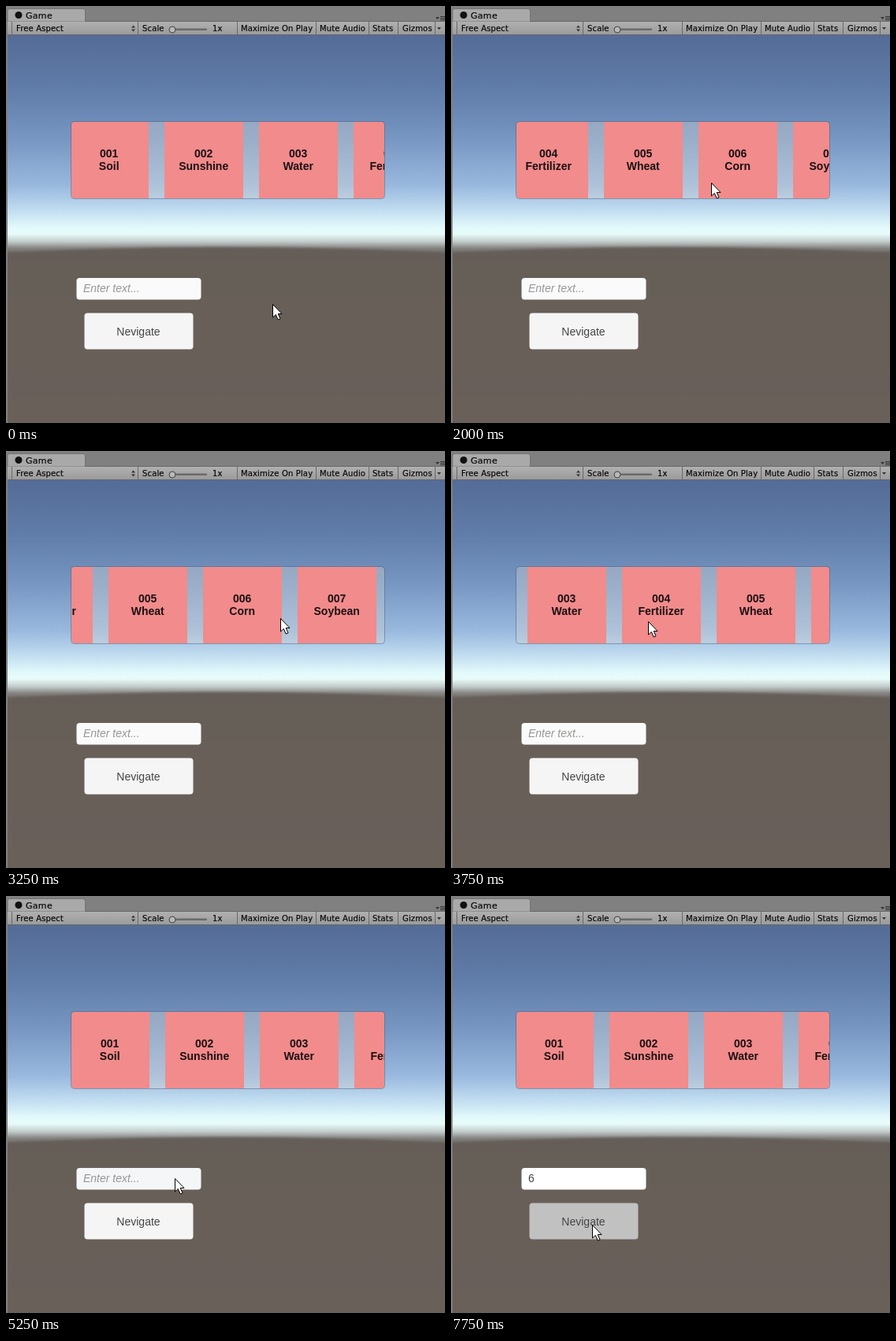
Write an HTML page that moves like this. It is 557 px wide and 529 px high and loops after 8 s.

```html
<!DOCTYPE html>
<html lang="en">
<head>
<meta charset="utf-8">
<title>Card scroller</title>
<style>
  html, body { margin: 0; width: 100%; height: 100%; overflow: hidden; background: #808080; }
  svg { display: block; width: 557px; height: 529px; }
  .ui { font: 10px "DejaVu Sans", sans-serif; letter-spacing: .15px; fill: #080808; stroke: #080808; stroke-width: .2px; }
  .ui.tab { font-size: 11px; letter-spacing: .3px; }
  .card text { font: bold 14px "Liberation Sans", Arial, sans-serif; text-anchor: middle; fill: #1c1012; }
  .control { font: 14px "Liberation Sans", Arial, sans-serif; fill: #454545; }
  #hint { font-style: italic; fill: #979797; }
</style>
</head>
<body>
<svg viewBox="0 0 557 529">
  <defs>
    <linearGradient id="sky" gradientUnits="userSpaceOnUse" x1="0" y1="37" x2="0" y2="317">
      <stop offset="0" stop-color="#546c97"/>
      <stop offset=".24" stop-color="#607ca8"/>
      <stop offset=".47" stop-color="#7796c2"/>
      <stop offset=".68" stop-color="#98b8de"/>
      <stop offset=".8" stop-color="#c4dff1"/>
      <stop offset=".87" stop-color="#e2f9fb"/>
      <stop offset=".9" stop-color="#e8fcfa"/>
      <stop offset=".935" stop-color="#c2cccb"/>
      <stop offset=".965" stop-color="#858482"/>
      <stop offset="1" stop-color="#645d58"/>
    </linearGradient>
    <linearGradient id="ground" x1="0" y1="0" x2="0" y2="1">
      <stop offset="0" stop-color="#655d58"/>
      <stop offset="1" stop-color="#6a605a"/>
    </linearGradient>
    <linearGradient id="bar" x1="0" y1="0" x2="0" y2="1">
      <stop offset="0" stop-color="#b0b0b0"/>
      <stop offset="1" stop-color="#9a9a9a"/>
    </linearGradient>
    <filter id="haze"><feGaussianBlur stdDeviation="1.5"/></filter>
    <clipPath id="view"><rect x="2" y="37" width="555" height="492"/></clipPath>
    <clipPath id="panel"><rect x="83" y="147" width="397" height="97" rx="4"/></clipPath>
  </defs>

  <rect width="557" height="529" fill="#808080"/>
  <g clip-path="url(#view)">
    <rect x="2" y="37" width="555" height="290" fill="url(#sky)"/>
    <path d="M-20 314Q280 298 580 314V560H-20Z" fill="url(#ground)" filter="url(#haze)"/>
  </g>

  <g id="toolbar">
    <path d="M2 20V6Q2 3.500 5 3.500H97Q100.500 3.500 100.500 6V20Z" fill="#a9a9a9" stroke="#666" stroke-width=".7"/>
    <rect x="2" y="20" width="555" height="17" fill="url(#bar)"/>
    <path d="M101 19.500H557M2 36.500H557" stroke="#686868"/>
    <circle cx="16" cy="11.500" r="4.500" fill="#111"/>
    <path d="M545 14h5l-2.500 3ZM551 13h6v1h-6ZM551 15h6v1h-6ZM551 17h6v1h-6Z" fill="#333"/>
    <path d="M159 27.500l2.500-3 2.500 3ZM159 29.500l2.500 3 2.500-3ZM547 27h5l-2.500 3Z" fill="#333"/>
    <rect x="211" y="28.500" width="44" height="2.500" rx="1" fill="#6a6a6a"/>
    <circle cx="211" cy="30" r="4" fill="#b8b8b8" stroke="#444"/>
  </g>

  <rect x="83" y="147" width="397" height="97" rx="4" fill="#d0d0d0" fill-opacity=".4"/>
  <g clip-path="url(#panel)"><g id="cards"></g></g>
  <rect x="82.500" y="146.500" width="398" height="98" rx="4" fill="none" stroke="#4d607c" stroke-opacity=".5"/>

  <g class="control">
    <rect id="field" x="89.500" y="345" width="158" height="27.500" rx="4"/>
    <text id="hint" x="98" y="363">Enter text...</text>
    <text id="typed" x="98" y="363">6</text>
    <rect id="button" x="99.500" y="389.500" width="138" height="46" rx="4"/>
    <text x="168" y="417.500" text-anchor="middle">Nevigate</text>
  </g>
  <path id="cursor" d="M.5 .5V17L4.300 13.500 7.200 20 10 18.800 7.200 12.500H12Z" fill="#fff" stroke="#000" stroke-linejoin="round"/>
</svg>
<script>
const STEP = 250, LOOP = 8000;
const HOVERED_AT = 5000, TYPED_AT = 5750, PRESSED_AT = 7250;
const PITCH = 120;
const names = ["Soil", "Sunshine", "Water", "Fertilizer", "Wheat",
               "Corn", "Soybean", "Sugarcane", "Egg", "Milk"];

// Key points: time, then the values reached at that time.
const pointerKeys = [
  [0, 338, 378], [1000, 290, 228], [1500, 104, 234], [2000, 330, 224],
  [2500, 140, 210], [2750, 245, 207], [3500, 400, 214], [3750, 250, 216],
  [4500, 390, 222], [5000, 230, 361], [5250, 214, 358], [6250, 179, 384], [6500, 179, 417]
];
const scrollKeys = [[1000, 0], [1500, 186], [2750, 638], [3750, 224], [4500, -20], [5250, -1], [5500, 0]];

const byId = id => document.getElementById(id);
const [cards, field, hint, typed, button, cursor] =
  ["cards", "field", "hint", "typed", "button", "cursor"].map(byId);

// Linear interpolation between key points, held before the first and after the last.
function valuesAt(keys, time) {
  const next = keys.findIndex(key => key[0] > time);
  if (next === 0) return keys[0].slice(1);
  if (next < 0) return keys.at(-1).slice(1);
  const [t0, ...from] = keys[next - 1];
  const [t1, ...to] = keys[next];
  const part = (time - t0) / (t1 - t0);
  return from.map((v, i) => Math.round(v + (to[i] - v) * part));
}

function add(parent, tag, attrs, text = "") {
  const node = document.createElementNS("http://www.w3.org/2000/svg", tag);
  for (const key in attrs) node.setAttribute(key, attrs[key]);
  node.textContent = text;
  return parent.appendChild(node);
}

const move = (node, x, y) => node.setAttribute("transform", `translate(${x} ${y})`);
const show = (node, on) => node.setAttribute("visibility", on ? "visible" : "hidden");

function buildToolbar() {
  const labels = [["Free Aspect", 13], ["Scale", 173], ["1x", 262], ["Maximize On Play", 298],
                  ["Mute Audio", 398], ["Stats", 465], ["Gizmos", 503]];
  const bar = byId("toolbar");
  for (const [text, x] of labels) add(bar, "text", { class: "ui", x, y: 32 }, text);
  add(bar, "text", { class: "ui tab", x: 25, y: 16 }, "Game");
  for (const x of [7, 167, 293, 393, 460, 497, 544])
    add(bar, "rect", { x, y: 20, width: 1, height: 16, fill: "#696969" });
}

function buildCards() {
  names.forEach((name, i) => {
    const card = add(cards, "g", { class: "card" });
    move(card, 81 + i * PITCH, 147);
    add(card, "rect", { width: 100, height: 97, fill: "#f28b8b" });
    add(card, "text", { x: 49.7, y: 45 }, String(i + 1).padStart(3, "0"));
    add(card, "text", { x: 49.7, y: 61 }, name);
  });
}

function fieldColor(time) {
  if (time >= PRESSED_AT) return "#ffffff";
  return time >= HOVERED_AT ? "#f4f6f7" : "#f9faf9";
}

function draw(time) {
  const tick = Math.floor(time / STEP) * STEP;
  const [x, y] = valuesAt(pointerKeys, tick);
  const [scroll] = valuesAt(scrollKeys, tick);
  move(cursor, x, y);
  move(cards, -scroll, 0);
  show(hint, tick < TYPED_AT);
  show(typed, tick >= TYPED_AT);
  field.setAttribute("fill", fieldColor(tick));
  button.setAttribute("fill", tick >= PRESSED_AT ? "#c1c1c1" : "#f5f5f5");
}

buildToolbar();
buildCards();
const start = performance.now();
function play() {
  draw((performance.now() - start) % LOOP);
  requestAnimationFrame(play);
}
play();
</script>
</body>
</html>
```
